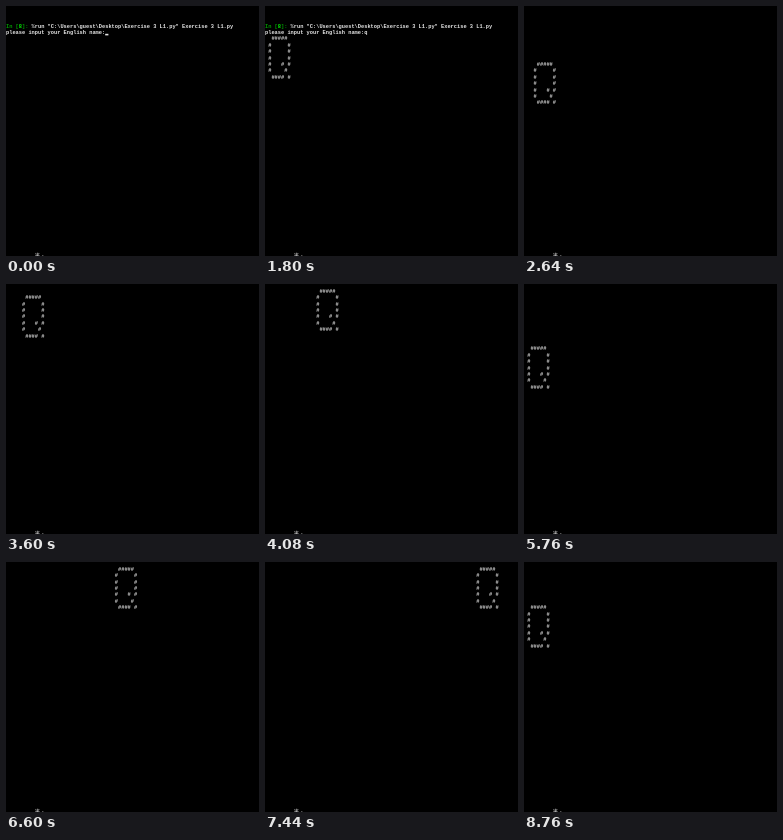
An HTML page with a canvas for the animation above (9.24 s loop, 253x250 px).

```html
<!DOCTYPE html>
<html lang="en">
<head>
<meta charset="utf-8">
<title>Console letter</title>
<style>
  html, body { margin: 0; width: 100%; height: 100%; overflow: hidden; background: #000; }
  canvas { display: block; }
</style>
</head>
<body>
<canvas id="stage" width="253" height="250"></canvas>
<script>
const ctx = document.getElementById('stage').getContext('2d');
const LOOP = 9240, SCALE = 0.4, CELL_W = 8, CELL_H = 16, TOP = 9.5;
const WHITE = '#e4e4e4', GREEN = '#009a00', LIME = '#00f000';

const LETTER = [
  ' #####',
  '#     #',
  '#     #',
  '#     #',
  '#   # #',
  '#    #',
  ' #### #'
];

// [start ms, column, row] of the wandering letter; no column means a cleared screen
const MOVES = [
  [2160], [2280, 5, 0], [2640, 3, 8], [3120, 1, 9], [3600, 5, 1],
  [4080, 16, 0], [4440, 31, 0], [4920, 36, 0], [5280], [5400, 17, 6],
  [5760, 1, 9], [6240, 1, 4], [6600, 34, 0], [7080, 61, 0], [7440, 66, 0],
  [7920, 43, 4], [8280, 1, 9], [8760, 1, 6]
];

// Every character sits on the console grid; wide ones take two cells.
function print(text, col, row, color = WHITE) {
  ctx.fillStyle = color;
  for (const ch of text) {
    if (ch !== ' ') ctx.fillText(ch, col * CELL_W, TOP + row * CELL_H + 12.5);
    col += ch > '\u2e80' ? 2 : 1;
  }
}

function cursor(col, row) {
  ctx.fillStyle = WHITE;
  ctx.fillRect(col * CELL_W, TOP + row * CELL_H + 12, CELL_W, 4);
}

function printLetter(col, row) {
  LETTER.forEach((line, i) => print(line, col, row + i, '#d8d8d8'));
}

function session(t) {
  print('In [', 0, 2, GREEN);
  print('8', 4, 2, LIME);
  print(']:', 5, 2, GREEN);
  print('%run "C:\\Users\\guest\\Desktop\\Exercise 3 L1.py" Exercise 3 L1.py', 8, 2);
  print('please input your English name:' + (t < 240 ? '' : 'q'), 0, 3);
  if (t < 240) cursor(31, 3);
  else if (t < 720 || (t >= 1320 && t < 1680)) cursor(32, 3);
  if (t >= 1800) printLetter(1, 4);
}

function draw(t) {
  ctx.setTransform(1, 0, 0, 1, 0, 0);
  ctx.fillStyle = '#000';
  ctx.fillRect(0, 0, 253, 250);
  ctx.scale(SCALE, SCALE);
  ctx.font = 'bold 13.333px "Liberation Mono", "Noto Sans CJK SC", monospace';

  if (t < MOVES[0][0]) {
    session(t);
  } else {
    const [start, col, row] = MOVES.findLast(move => move[0] <= t);
    if (col !== undefined) printLetter(col, row);
    else if (start === MOVES[0][0]) cursor(0, -1);
  }
  print('半:', 9, 38, '#c0c0c0');
}

const begin = performance.now();
function tick() {
  draw((performance.now() - begin) % LOOP);
  requestAnimationFrame(tick);
}
tick();
</script>
</body>
</html>
```
